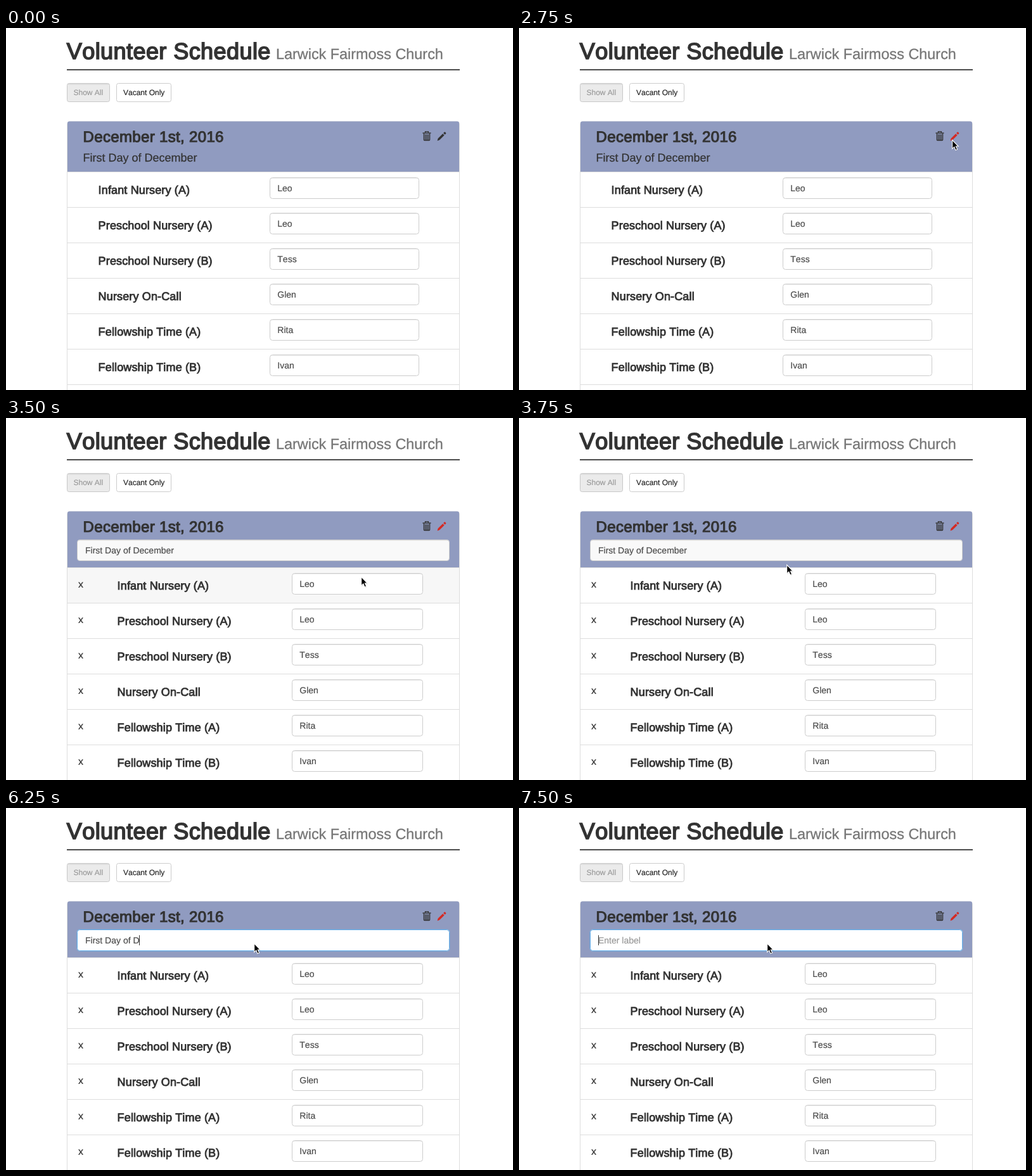
Recreate the animation shown at these times as an HTML page. Size 800x572 px, loop 8 s.

```html
<!DOCTYPE html>
<html lang="en">
<head>
<meta charset="utf-8">
<title>Volunteer Schedule</title>
<style>
html, body { margin: 0; width: 100%; height: 100%; overflow: hidden; background: #fff; }
svg { display: block; width: 800px; height: 572px; }
text {
  font-family: "Liberation Sans", Arial, sans-serif;
  font-kerning: none;
  text-rendering: geometricPrecision;
  fill: #333;
  stroke: #333;
  stroke-width: .014em;
}
.medium { stroke-width: .048em; letter-spacing: .012em; }
.h1 { font-size: 36px; }
.h1-small { font-size: 23.4px; fill: #777; stroke: #777; }
.h3 { font-size: 24px; letter-spacing: .014em; }
.h4 { font-size: 18px; }
.row-label { letter-spacing: .008em; }
.btn { font-size: 12px; fill: #222; stroke: #222; }
.off { fill: #999; stroke: #999; }
.value { font-size: 14px; fill: #4c4c4c; stroke: #4c4c4c; }
.cross { font-size: 16px; }
.field { fill: #fff; stroke: #ccc; }
.line { stroke: #ddd; }
.inset { stroke: #000; stroke-opacity: .07; }

/* Every state change is a hard cut on one 8 s clock. */
.read, .edit, .hover, .field-bg, .focus, .erase, .caret, .hint, .pencil, .pointer {
  animation: 8s step-end infinite;
}
.read { animation-name: read; }
.edit { animation-name: edit; }
.hover { animation-name: hover; }
.field-bg { animation-name: field-bg; }
.focus { animation-name: focus; }
.erase { animation-name: erase; }
.caret { animation-name: caret; }
.hint { animation-name: hint; fill: #999; stroke: #999; }
.pencil { animation-name: pencil; }
.pointer { animation-name: pointer; }

@keyframes read { 0% { opacity: 1 } 40.625%, 100% { opacity: 0 } }
@keyframes edit { 0% { opacity: 0 } 40.625%, 100% { opacity: 1 } }
@keyframes hover { 0% { opacity: 0 } 43.75% { opacity: 1 } 46.875%, 100% { opacity: 0 } }
@keyframes field-bg { 0% { fill: #fff } 43.75% { fill: #f9f9f9 } 56.25%, 100% { fill: #fff } }
@keyframes focus { 0% { opacity: 0 } 56.25%, 100% { opacity: 1 } }
@keyframes hint { 0% { opacity: 0 } 93.75%, 100% { opacity: 1 } }
@keyframes pencil { 0% { fill: #333 } 34.375%, 100% { fill: #d42a24 } }
@keyframes caret { 0% { opacity: 1 } 62.5% { opacity: 0 } 68.75%, 100% { opacity: 1 } }
@keyframes erase {
  0% { transform: translateX(265px) }
  68.75% { transform: translateX(260px) }
  75% { transform: translateX(233px) }
  78.125% { transform: translateX(210px) }
  81.25% { transform: translateX(192px) }
  84.375% { transform: translateX(174px) }
  87.5% { transform: translateX(152px) }
  90.625% { transform: translateX(136px) }
  93.75%, 100% { transform: translateX(125px) }
}
@keyframes pointer {
  0% { transform: translate(668px, 240px); opacity: 0 }
  9.375% { transform: translate(668px, 240px); opacity: 1 }
  12.5% { transform: translate(680px, 197px) }
  15.625% { transform: translate(680px, 182px) }
  18.75% { transform: translate(683px, 176px) }
  31.25% { transform: translate(683px, 200px) }
  34.375% { transform: translate(683px, 176px) }
  43.75% { transform: translate(560px, 250px) }
  46.875% { transform: translate(422px, 231px) }
  50% { transform: translate(400px, 224px) }
  53.125%, 100% { transform: translate(391px, 213px); opacity: 1 }
}
</style>
</head>
<body>
<svg viewBox="0 0 800 572" xmlns="http://www.w3.org/2000/svg">
  <rect width="800" height="572" fill="#fff"/>

  <text class="h1 medium" x="95.8" y="49">Volunteer Schedule</text>
  <text class="h1-small" x="426" y="49">Larwick Fairmoss Church</text>
  <rect x="96" y="65" width="620" height="2" fill="#4c4c4c"/>

  <rect x="96.5" y="87.5" width="67" height="29" rx="3" fill="#ebebeb" stroke="#c8c8c8"/>
  <path d="M98 89.5H162M98 88.5H162" stroke="#000" stroke-opacity=".05"/>
  <text class="btn off" x="106.5" y="106">Show All</text>
  <rect x="174.5" y="87.5" width="86" height="29" rx="3" fill="#fff" stroke="#ccc"/>
  <text class="btn" x="185" y="106">Vacant Only</text>

  <path class="line" d="M96.5 580V152a4 4 0 0 1 4-4H711.5a4 4 0 0 1 4 4V580" fill="none"/>

  <g class="read">
    <path d="M97 227V150.5a3 3 0 0 1 3-3H712a3 3 0 0 1 3 3V227Z" fill="#909bc0"/>
    <text class="h4" x="121.4" y="211">First Day of December</text>
    <g id="readRows"></g>
  </g>

  <g class="edit">
    <path d="M97 236V150.5a3 3 0 0 1 3-3H712a3 3 0 0 1 3 3V236Z" fill="#909bc0"/>
    <rect class="field field-bg" x="112.5" y="192.5" width="587" height="33" rx="4"/>
    <path class="inset" d="M115 193.5H697"/>
    <g class="focus">
      <rect x="112.5" y="192.5" width="587" height="33" rx="4" fill="none" stroke="#66afe9" stroke-width="3" opacity=".3"/>
      <rect x="112.5" y="192.5" width="587" height="33" rx="4" fill="#fff" stroke="#66afe9"/>
    </g>
    <text class="value" x="125" y="214">First Day of December</text>
    <g class="focus">
      <g class="erase">
        <rect y="198" width="145" height="22" fill="#fff"/>
        <rect class="caret" y="201" width="1" height="16" fill="#333"/>
      </g>
      <text class="value hint" x="125" y="214">Enter label</text>
    </g>
    <rect class="hover" x="97" y="237" width="618" height="55" fill="#f7f7f7"/>
    <g id="editRows"></g>
  </g>

  <text class="h3 medium" x="121.6" y="180">December 1st, 2016</text>

  <g fill="none" stroke="#333">
    <path d="M657.5 166H670.5" stroke-width="1.5"/>
    <path d="M661.5 165.5V163.6H666.5V165.5" stroke-width="1.3"/>
    <path d="M659.5 167V176.4q0 1.1 1.1 1.1H667.4q1.1 0 1.1-1.1V167" stroke-width="1.5"/>
    <path d="M661.8 168V177M664 168V177M666.2 168V177" stroke-width="1.3"/>
  </g>
  <path class="pencil" d="M680.6 178.2L681.6 174.6 689.2 167 691.6 169.4 684 177ZM690.1 166.1L691.6 164.6Q692.3 164 693 164.6L694.1 165.7Q694.7 166.4 694.1 167.1L692.5 168.5Z"/>

  <g class="pointer">
    <path d="M1.3 2.2V16L4.4 13.2 6.5 18.2 9.2 17 7.1 12.2H11.2Z" fill="#000" opacity=".18"/>
    <path d="M.7 1.2V14.8L3.8 12 6 17.1 8.6 16 6.4 11H10.3Z" fill="#000" stroke="#fff" stroke-width="1.1"/>
  </g>
</svg>
<script>
const duties = [
  ["Infant Nursery (A)", "Leo"],
  ["Preschool Nursery (A)", "Leo"],
  ["Preschool Nursery (B)", "Tess"],
  ["Nursery On-Call", "Glen"],
  ["Fellowship Time (A)", "Rita"],
  ["Fellowship Time (B)", "Ivan"]
];

function fillRows(id, top, labelX, fieldX, fieldW, crossed) {
  const rows = duties.map(([label, name], i) => {
    const y = top + 56 * i;
    return `<path class="line" d="M97 ${y + 56.5}H715"/>
      ${crossed ? `<text class="cross" x="114" y="${y + 32}">x</text>` : ""}
      <text class="h4 medium row-label" x="${labelX}" y="${y + 35}">${label}</text>
      <rect class="field" x="${fieldX + .5}" y="${y + 9.5}" width="${fieldW - 1}" height="33" rx="4"/>
      <path class="inset" d="M${fieldX + 3} ${y + 10.5}h${fieldW - 6}"/>
      <text class="value" x="${fieldX + 12.3}" y="${y + 31}">${name}</text>`;
  });
  document.getElementById(id).innerHTML =
    `<path class="line" d="M97 ${top + .5}H715"/>` + rows.join("");
}

fillRows("readRows", 227, 145.6, 416, 236, false);
fillRows("editRows", 236, 175.6, 451, 207, true);
</script>
</body>
</html>
```
